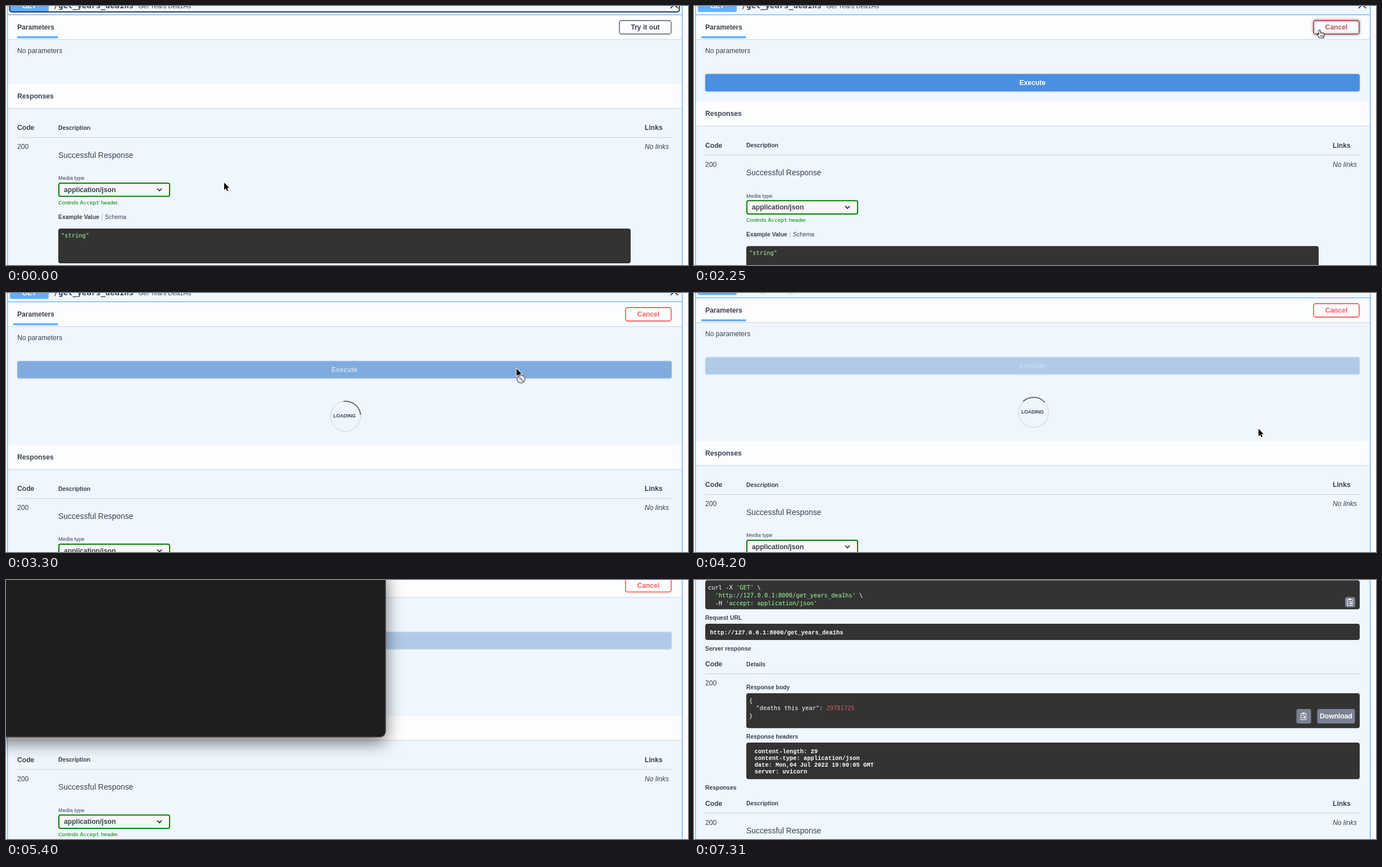
These frames come from a looping animation (1213x462 px, 7.6 s). An HTML page with a canvas:

```html
<!DOCTYPE html>
<html lang="en">
<head>
<meta charset="utf-8">
<title>API docs</title>
<style>
html, body { margin: 0; width: 100%; height: 100%; overflow: hidden; background: #fff; }
canvas { display: block; }
</style>
</head>
<body>
<canvas id="stage" width="1213" height="462"></canvas>
<script>
const c = document.getElementById('stage').getContext('2d');
const LOOP = 7600, INK = '#3b4151', BLUE = '#61affe', DARK = '#333', GREY = '#7d8293', GREEN = '#a2fca2';
const SANS = '"Liberation Sans", Arial, sans-serif';
const MONO = '"DejaVu Sans Mono", Menlo, monospace';
const SLAB = '"Liberation Mono", "Courier New", monospace';
const S = 9.53, M = 10.4, L = 12.13, XL = 13.87;   // text sizes

// Pointer waypoints: time, x, y
const path = [
  [0, 388, 315], [150, 441, 243], [450, 441, 243], [600, 800, 150], [750, 1077, 84], [900, 1077, 84],
  [1500, 1113, 43], [2250, 1113, 43], [3000, 908, 135], [3450, 908, 135], [4050, 1004, 242],
  [4500, 1004, 243], [4650, 1040, 300], [4950, 1136, 446], [5100, 1150, 480],
  [5400, 1150, 480], [5520, 663, 196], [6420, 663, 196], [6570, 915, 318], [6720, 1028, 372],
  [6870, 1087, 419], [7020, 1087, 419], [7170, 1152, 443], [7320, 1170, 490], [7600, 1170, 490]
];

const clamp = v => Math.max(0, Math.min(1, v));

function text(str, x, mid, size = L, weight = '', color = INK, font = SANS, align = 'left') {
  c.font = `${weight} ${size}px ${font}`;
  c.fillStyle = color;
  c.textAlign = align;
  c.fillText(str, x, mid + size * .355);
}
const bold = (str, x, mid, size = L) => text(str, x, mid, size, 'bold');
const code = (str, x, mid, color = '#fff') => text(str, x, mid, M, '', color, MONO);

function box(x, y, w, h, fill, r = 0, stroke, line = 2) {
  c.beginPath();
  c.roundRect(x, y, w, h, r);
  if (fill) { c.fillStyle = fill; c.fill(); }
  if (stroke) { c.strokeStyle = stroke; c.lineWidth = line; c.stroke(); }
}
function poly(points, color, width, fill) {
  c.beginPath();
  points.forEach(p => c.lineTo(...p));
  if (fill) { c.closePath(); }
  c.strokeStyle = color; c.lineWidth = width; c.stroke();
  if (fill) { c.fillStyle = fill; c.fill(); }
}
function shadowed(color, blur, dy, draw) {
  c.save();
  c.shadowColor = color; c.shadowBlur = blur; c.shadowOffsetY = dy;
  draw();
  c.restore();
}
const band = (y, h) => shadowed('rgba(0,0,0,.15)', 2, 1, () => box(3, y, 1199, h, '#fcfdff'));
const rule = y => box(20, y, 1164, 1, 'rgba(59,65,81,.2)');

function block() {
  c.fillStyle = '#fff';
  c.fillRect(0, 0, 1213, 462);
  box(3, 0, 1199, 462, '#eff6fe');
}
function sides() {
  box(2, 0, 1.3, 462, BLUE);
  box(1202, 0, 1.3, 462, BLUE);
}

function table(y) {
  bold('Code', 20, y);
  bold('Description', 93, y, M);
  bold('Links', 1136, y);
  rule(y + 17);
  text('200', 20, y + 34);
  text('No links', 1136, y + 34, L, 'italic');
  text('Successful Response', 93, y + 49, XL);
}

function responses(y) {
  band(y, 43);
  bold('Responses', 20, y + 21.5);
  table(y + 78);
  text('Media type', 93, y + 168, S);
  box(94, y + 177, 197, 23.6, '#f7f7f7', 3, '#008000');
  bold('application/json', 103, y + 188.7);
  poly([[269, y + 186.7], [273, y + 190.7], [277, y + 186.7]], '#111', 1.6);
  text('Controls', 93, y + 211.5, S, '', '#008000');
  text('Accept', 131.5, y + 211.5, S, '', '#008000', MONO);
  text('header.', 169, y + 211.5, S, '', '#008000');
  bold('Example Value', 93, y + 237.5, M);
  box(170.5, y + 232, 1, 12, 'rgba(59,65,81,.3)');
  text('Schema', 176, y + 237.5, M);
  box(93, y + 258, 1018, 62, DARK, 4);
  code('"string"', 98, y + 270, GREEN);
}

function topButton(t, hover) {
  const open = t >= 2100, p = open ? clamp((t - 2070) / 300) : 0;
  const mix = (a, b) => Math.round(a + (b - a) * p);
  const color = `rgb(${mix(59, 255)},${mix(65, 96)},${mix(81, 96)})`;
  const x = open ? 1102 : 1091;
  const draw = () => box(x, 26, 1183 - x, 24, '#fcfdff', 3.5, open ? color : '#7d8089', 1.8);
  hover ? shadowed('rgba(0,0,0,.4)', 5, 0, draw) : draw();
  text(open ? 'Cancel' : 'Try it out', open ? 1142.5 : 1137, 38, L, 'bold', color, SANS, 'center');
}

function spinner(t) {
  const mid = (-52 + (t - 3300) * .36) * Math.PI / 180;
  c.lineWidth = 1.8;
  c.strokeStyle = 'rgba(85,85,85,.12)';
  c.beginPath(); c.arc(604, 220, 26.8, 0, 7); c.stroke();
  c.strokeStyle = 'rgba(60,60,60,.8)';
  c.beginPath(); c.arc(604, 220, 26.8, mid - .8, mid + .8); c.stroke();
  text('LOADING', 602, 218.5, 8.67, 'bold', INK, SANS, 'center');
}

function requestPage(t, hover) {
  const open = t >= 2100, sent = t >= 3150;
  block();
  c.save();
  c.translate(0, t >= 4350 ? -28.7 : t >= 4200 ? -7 : 0);
  box(7, -20, 69, 30.5, BLUE, 3);
  text('GET', 41.3, 0, L, 'bold', '#fff', SANS, 'center');
  text('/get_years_dea1hs', 85, -1, XL, 'bold', INK, MONO);
  text('Get Years Dea1Hs', 235.5, -.5, 11.27);
  poly([[1182, 4], [1188.5, -2.5], [1195, 4]], '#222', 1.6);
  if (!open) box(6.5, -20, 1191, 30.5, null, 4, '#25303f', 2);
  band(16, 43);
  box(3, 15, 1199, 1.2, BLUE);
  const left = open ? 13 : 20;
  box(left, 54, 92.5 - left, 3.5, BLUE);
  bold('Parameters', 20, 38);
  topButton(t, hover);
  text('No parameters', 20, 79.5);
  if (open) {
    c.globalAlpha = sent ? 1 - .7 * clamp((t - 3120) / 300) : 1;
    shadowed('rgba(0,0,0,.25)', 3, .5, () => box(20, 121.3, 1164, 31, '#4990e2', 3.5));
    text('Execute', 602, 137, L, 'bold', '#fff', SANS, 'center');
    c.globalAlpha = 1;
  }
  if (sent) spinner(t);
  responses(sent ? 271 : open ? 170.3 : 139);
  c.restore();
  sides();
  if (t >= 4350) {
    shadowed('rgba(0,0,0,.55)', 30, 9, () => box(-20, -20, 695.5, 300.5, '#1e1e1e', 10));
    box(-20, -20, 695, 300, null, 10, '#5c5c5c', 1);
  }
}

function copyButton(x, y, size) {
  box(x, y, size, size, GREY, 3.5);
  c.save();
  c.translate(x + size / 2, y + size / 2);
  box(-5, -5, 9, 11, null, 1, '#fff', 1.1);
  box(-2.5, -6.5, 4, 3, '#fff', 1);
  poly([[-3, -1], [2, -1]], '#fff', 1);
  poly([[-3, 3], [-1, 3]], '#fff', 1);
  box(.5, -.2, 6, 4.4, GREY);
  poly([[6, 2], [0, 2]], '#fff', 1.1);
  poly([[2.5, -.2], [0, 2], [2.5, 4.2]], '#fff', 1.1);
  c.restore();
}

function resultPage() {
  block();
  box(20, .5, 1164, 51.7, DARK, 4);
  code('curl -X', 25, 13);
  code("'GET'", 75, 13, GREEN);
  code('\\', 112.6, 13);
  code("'http://127.0.0.1:8000/get_years_dea1hs'", 37.5, 27, GREEN);
  code('\\', 294, 27);
  code('-H', 37.5, 41);
  code("'accept: application/json'", 56.3, 41, GREEN);
  copyButton(1158, 30.5, 18);
  bold('Request URL', 20, 67, M);
  box(20, 78, 1164, 29, DARK, 4);
  text('http://127.0.0.1:8000/get_years_dea1hs', 28.5, 93, M, 'bold', '#fff', SLAB);
  bold('Server response', 20, 122, M);
  bold('Code', 20, 150);
  bold('Details', 93, 150, M);
  rule(167);
  text('200', 20, 184);
  bold('Response body', 93, 191.5, M);
  box(93, 202, 1091, 62.3, DARK, 4);
  code('{', 98, 215);
  code('"deaths this year":', 110.5, 228.5);
  code('29781725', 235.5, 228.5, '#d36363');
  code('}', 98, 242.5);
  copyButton(1071.5, 230, 26);
  box(1108.5, 230, 67, 26, GREY, 3.5);
  text('Download', 1142, 243, L, 'bold', '#fff', SANS, 'center');
  bold('Response headers', 93, 279.5, M);
  box(93, 290, 1091, 65.3, DARK, 4);
  ['content-length: 29', 'content-type: application/json', 'date: Mon,04 Jul 2022 19:00:05 GMT', 'server: uvicorn']
    .forEach((s, i) => text(s, 107.7, 305 + i * 12.2, M, 'bold', '#fff', SLAB));
  bold('Responses', 20, 370.5, M);
  table(398.5);
  sides();
}

function pointer(x, y, kind) {
  c.save();
  c.translate(x, y);
  c.lineJoin = 'round';
  if (kind === 'hand') {
    c.beginPath();
    c.moveTo(-1.8, 8);
    c.lineTo(-1.8, 1);
    c.quadraticCurveTo(0, -1.5, 1.3, 1);
    c.lineTo(1.5, 5);
    c.quadraticCurveTo(3, 3.8, 4, 5.3);
    c.quadraticCurveTo(5.5, 4.5, 6.2, 6);
    c.quadraticCurveTo(8, 5.5, 8, 7.5);
    c.quadraticCurveTo(8, 11, 6.5, 14);
    c.lineTo(-.5, 14);
    c.quadraticCurveTo(-2.5, 11, -4.5, 8.5);
    c.quadraticCurveTo(-4.3, 6, -1.8, 8);
    c.fillStyle = '#fff'; c.fill();
    c.strokeStyle = '#111'; c.lineWidth = 1.1; c.stroke();
    [1.8, 3.8, 5.6].forEach(f => poly([[f, 9], [f, 12]], '#111', .8));
  } else {
    poly([[0, 0], [0, 13], [3, 10.3], [5, 14.8], [7.2, 13.9], [5.2, 9.5], [9.2, 9.3]], '#fff', 2, '#000');
  }
  if (kind === 'blocked') {
    c.beginPath(); c.arc(8, 18.5, 7, 0, 7);
    c.fillStyle = '#e4e6ea'; c.fill();
    c.strokeStyle = '#80858e'; c.lineWidth = 1.8; c.stroke();
    poly([[3.2, 13.7], [12.8, 23.3]], '#80858e', 1.8);
  }
  c.restore();
}

function pointerAt(t) {
  const i = Math.max(1, path.findIndex(p => p[0] >= t));
  const [t0, x0, y0] = path[i - 1], [t1, x1, y1] = path[i], p = (t - t0) / (t1 - t0);
  return [x0 + (x1 - x0) * p, y0 + (y1 - y0) * p];
}

function draw(now) {
  const raw = now % LOOP;
  const t = raw < 5520 ? Math.floor(raw / 150) * 150 : 5520 + Math.floor((raw - 5510) / 150) * 150;
  const [x, y] = pointerAt(t);
  const onTop = t < 4000 && x > (t < 2100 ? 1090 : 1101) && y > 25 && y < 50;
  const onExecute = t >= 2100 && t < 4200 && y > 121 && y < 153;
  t < 5520 ? requestPage(t, onTop) : resultPage();
  pointer(x, y, onTop || (onExecute && t < 3150) ? 'hand' : onExecute ? 'blocked' : 'arrow');
}

let start;
function tick(now) {
  start ??= now;
  draw(now - start);
  requestAnimationFrame(tick);
}
requestAnimationFrame(tick);
</script>
</body>
</html>
```
